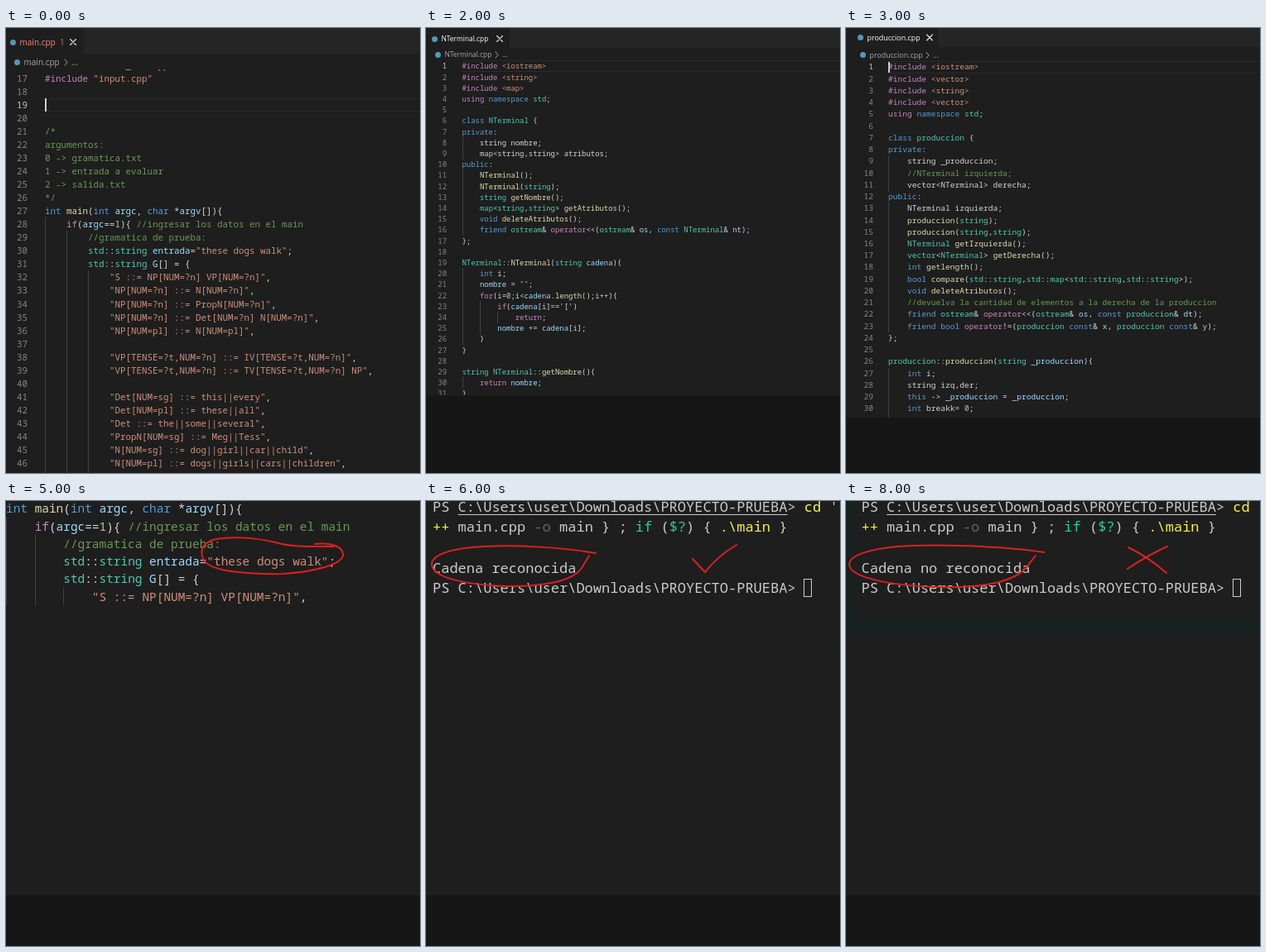
Recreate the animation shown at these times as an HTML page. Size 500 px wide and 538 px high, loop 9000 ms.

```html
<!DOCTYPE html>
<html lang="es">
<head>
<meta charset="utf-8">
<title>Code walkthrough</title>
<style>
html, body { margin: 0; width: 100%; height: 100%; overflow: hidden; background: #161616; }
#stage { position: relative; width: 500px; height: 538px; overflow: hidden; background: #161616; }
.slide { position: absolute; inset: 0; background: #161616; visibility: hidden; animation: show 9s step-end infinite; }
@keyframes show {
  0% { visibility: visible; }
  11.1112%, 100% { visibility: hidden; }
}
.slide div { position: absolute; }
.paper { left: 0; top: 0; width: 500px; background: #1e1e1e; }
.code { left: 0; top: 0; width: 500px; overflow: hidden; }
.line { white-space: pre; font-family: "Noto Sans Mono", "DejaVu Sans Mono", monospace; font-variant-ligatures: none; color: #d4d4d4; }
.guide { width: 1px; background: #404040; }
.current { right: 0; box-sizing: border-box; border: solid #2b2b2b; border-width: 1px 0; }
.ui { white-space: pre; font-family: "Open Sans", "Noto Sans", sans-serif; line-height: 16px; color: #a9a9a9; }
.dot { width: 7px; height: 7px; border-radius: 50%; background: #519aba; }
.bar { background: #252526; right: 0; top: 0; }
svg { position: absolute; left: 0; top: 0; fill: none; stroke-linecap: round; stroke-linejoin: round; }
.key { color: #569cd6; } .ctl { color: #c586c0; } .str { color: #ce9178; }
.com { color: #6a9955; } .type { color: #4ec9b0; } .fn { color: #dcdcaa; }
.var { color: #9cdcfe; } .num { color: #b5cea8; }
.term { color: #cccccc; }
.yel { color: #f5f543; } .grn { color: #23d18b; } .dim { color: #666; }
.under { text-decoration: underline; text-underline-offset: 3px; text-decoration-thickness: 1px; }
</style>
</head>
<body>
<div id="stage"></div>
<script>
const stage = document.getElementById('stage');
const set = words => new Set(words.split(' '));
const KEY = set('int char class private public bool void friend const this namespace true false');
const CTL = set('if else for while return using operator');
const TYPE = set('std string vector map ostream ifstream produccion NTerminal');
const TOKEN = /\/\/.*|"[^"]*"|#include|[A-Za-z_]\w*|\d+|\s+|./g;

function add(parent, cls, style = {}, text = '') {
  const node = document.createElement('div');
  node.className = cls;
  for (const k in style) node.style[k] = typeof style[k] === 'number' ? style[k] + 'px' : style[k];
  node.textContent = text;
  parent.append(node);
  return node;
}

function span(parent, text, cls) {
  const node = document.createElement('span');
  node.textContent = text;
  node.className = cls;
  parent.append(node);
}

function draw(slide, d, color, width) {
  slide.insertAdjacentHTML('beforeend',
    `<svg width="500" height="538" stroke="${color}" stroke-width="${width}"><path d="${d}"/></svg>`);
}

const mark = (slide, d) => draw(slide, d, '#d9201f', 2);

function kind(word, rest, plain) {
  if (/^\/\//.test(word)) return 'com';
  if (word[0] === '"') return 'str';
  if (word === '#include' || CTL.has(word)) return 'ctl';
  if (KEY.has(word)) return 'key';
  if (/^\d/.test(word)) return 'num';
  if (!/^\w/.test(word) || plain) return '';
  if (rest[0] === '(') return 'fn';
  return TYPE.has(word) ? 'type' : 'var';
}

// Line prefixes: % is a whole-line comment, ~ leaves plain names uncoloured.
function paint(node, src) {
  if (src[0] === '%') return span(node, src.slice(1), 'com');
  const plain = src[0] === '~';
  if (plain) src = src.slice(1);
  const inc = src.match(/^(#include )(.*)/);
  if (inc) { span(node, inc[1], 'ctl'); return span(node, inc[2], 'str'); }
  for (const m of src.matchAll(TOKEN))
    span(node, m[0], kind(m[0], src.slice(m.index + m[0].length), plain));
}

let count = 0;
function newSlide(paper) {
  const slide = add(stage, 'slide', { animationDelay: count++ + 's' });
  add(slide, 'paper', { height: paper });
  return slide;
}

// x: first column, y: middle of first line, adv: character width, gap: line pitch
function code(slide, o) {
  const box = add(slide, 'code', { top: o.top || 0, height: o.bottom - (o.top || 0) });
  const size = o.adv / 0.6;
  let indent = 0;
  o.text.split('\n').forEach((src, i) => {
    const top = o.y + i * o.gap - o.gap / 2 - (o.top || 0);
    const pos = { top, height: o.gap, lineHeight: o.gap + 'px', fontSize: size };
    const n = (o.first || 0) + i;
    if (n === o.active) add(box, 'current', { left: o.x, top, height: o.gap });
    const body = src.replace(/^[~%]/, '');
    if (body.trim()) indent = body.search(/\S/);
    for (let c = 0; c < indent; c += 4)
      add(box, 'guide', { left: o.x + c * o.adv, top, height: o.gap + 0.5 });
    if (o.first) add(box, 'line', { ...pos, right: 500 - o.numRight, color: n === o.active ? '#c6c6c6' : '#858585' }, n);
    paint(add(box, 'line', { ...pos, left: o.x }), src);
  });
}

function header(slide, o) {
  add(slide, 'bar', { left: o.tabEnd, height: o.barH });
  const label = (x, y, text, color, italic) =>
    add(slide, 'ui', { left: x, top: y - 8, fontSize: o.size, color, fontStyle: italic ? 'italic' : 'normal' }, text);
  const [ix, iy, jx, jy] = o.icons;
  add(slide, 'dot', { left: ix - 3.5, top: iy - 3.5 });
  add(slide, 'dot', { left: jx - 3.5, top: jy - 3.5 });
  label(ix + 8.5, iy, o.name, o.color || '#ffffff', o.italic);
  if (o.badge) label(o.badge, iy, '1', '#c5705d');
  label(jx + 8.5, jy, o.name, '#a9a9a9');
  label(o.chev + 6, jy, '...', '#a9a9a9');
  draw(slide, `M${o.close - 3.5},${iy - 3.5}l7,7m0,-7l-7,7`, '#e0e0e0', 1.1);
  draw(slide, `M${o.chev - 2},${jy - 3}l3,3.5l-3,3.5`, '#a0a0a0', 1);
}

function terminal(slide, o) {
  const box = add(slide, 'code', { height: o.bottom });
  o.rows.forEach(([row, ...parts]) => {
    const line = add(box, 'line term', {
      left: o.x, top: o.y + (row - 0.5) * o.gap, lineHeight: o.gap + 'px', fontSize: o.adv / 0.6
    });
    parts.forEach(([text, cls = '']) => span(line, text, cls));
  });
}

const caret = (slide, left, top, height) => add(slide, '', { left, top, height, width: 1.5, background: '#d0d0d0' });

let s = newSlide(538);
header(s, { name: 'main.cpp', icons: [8, 17, 13, 41], size: 10, color: '#f48771', badge: 65, close: 81, chev: 73, tabEnd: 94, barH: 31 });
code(s, {
  x: 47, y: 45, adv: 6.5, gap: 16.03, top: 50, bottom: 538, first: 16, numRight: 26, active: 19,
  text: `#include "arbol_sin.cpp"
#include "input.cpp"



%/*
%argumentos:
%0 -> gramatica.txt
%1 -> entrada a evaluar
%2 -> salida.txt
%*/
int main(int argc, char *argv[]){
    if(argc==1){ //ingresar los datos en el main
        //gramatica de prueba:
        std::string entrada="these dogs walk";
        std::string G[] = {
            "S ::= NP[NUM=?n] VP[NUM=?n]",
            "NP[NUM=?n] ::= N[NUM=?n]",
            "NP[NUM=?n] ::= PropN[NUM=?n]",
            "NP[NUM=?n] ::= Det[NUM=?n] N[NUM=?n]",
            "NP[NUM=pl] ::= N[NUM=pl]",

            "VP[TENSE=?t,NUM=?n] ::= IV[TENSE=?t,NUM=?n]",
            "VP[TENSE=?t,NUM=?n] ::= TV[TENSE=?t,NUM=?n] NP",

            "Det[NUM=sg] ::= this||every",
            "Det[NUM=pl] ::= these||all",
            "Det ::= the||some||several",
            "PropN[NUM=sg] ::= Meg||Tess",
            "N[NUM=sg] ::= dog||girl||car||child",
            "N[NUM=pl] ::= dogs||girls||cars||children",
            "IV[TENSE=pres,NUM=sg] ::= disappears||walks",`
});
caret(s, 47, 85, 16);

s = newSlide(444);
header(s, { name: 'input.cpp', icons: [10, 13, 14, 32], size: 8.4, italic: true, close: 68.5, chev: 65, tabEnd: 80, barH: 24 });
const small = { x: 43.5, y: 46, adv: 5.36, gap: 13.2, top: 39, bottom: 444, first: 1, numRight: 25, active: 1 };
code(s, {
  ...small,
  text: `#include <iostream>
#include <fstream>
#include <string>

int getNumeroProducciones(std::string grammartxt){
    std::ifstream myfile(grammartxt);
    if (myfile.is_open())
    {
        int n;
        myfile>>n;
        return n;
    }
    else std::cout << "Unable to open file";
    return 0;
}

int getGrammar(std::string grammartxt,int n,std::string G[]){
    std::ifstream myfile(grammartxt);
    if (myfile.is_open())
    {

        std::string temp;
        getline(myfile, temp); //salto de la primera linea
        for(int i=0;i<n;i++){
            getline(myfile, temp);
            G[i]=temp;
        }
    }
    else std::cout << "Unable to open file";
    return 0;
}`
});

s = newSlide(444);
header(s, { name: 'NTerminal.cpp', icons: [10, 13, 14, 32], size: 8.4, close: 89, chev: 86, tabEnd: 101, barH: 24 });
code(s, {
  ...small,
  text: `#include <iostream>
#include <string>
#include <map>
using namespace std;

class NTerminal {
private:
~    string nombre;
~    map<string,string> atributos;
public:
    NTerminal();
    NTerminal(string);
    string getNombre();
    map<string,string> getAtributos();
    void deleteAtributos();
    friend ostream& operator<<(ostream& os, const NTerminal& nt);
};

NTerminal::NTerminal(string cadena){
~    int i;
    nombre = "";
    for(i=0;i<cadena.length();i++){
        if(cadena[i]=='[')
            return;
        nombre += cadena[i];
    }
}

string NTerminal::getNombre(){
    return nombre;
}`
});

s = newSlide(471);
header(s, { name: 'produccion.cpp', icons: [17, 11.5, 20, 32.5], size: 8.9, close: 101, chev: 99, tabEnd: 111, barH: 23 });
code(s, {
  x: 51, y: 47.5, adv: 5.75, gap: 14.24, top: 40, bottom: 471, first: 1, numRight: 33, active: 1,
  text: `#include <iostream>
#include <vector>
#include <string>
#include <vector>
using namespace std;

class produccion {
private:
~    string _produccion;
    //NTerminal izquierda;
~    vector<NTerminal> derecha;
public:
~    NTerminal izquierda;
    produccion(string);
    produccion(string,string);
    NTerminal getIzquierda();
    vector<NTerminal> getDerecha();
    int getlength();
    bool compare(std::string,std::map<std::string,std::string>);
    void deleteAtributos();
    //devuelva la cantidad de elementos a la derecha de la produccion
    friend ostream& operator<<(ostream& os, const produccion& dt);
    friend bool operator!=(produccion const& x, produccion const& y);
};

produccion::produccion(string _produccion){
~    int i;
~    string izq,der;
    this -> _produccion = _produccion;
~    int breakk= 0;
    //divide la cadena en izquierda y der`
});
caret(s, 51, 41, 13);

s = newSlide(477);
code(s, {
  x: 47, y: 9, adv: 6.5, gap: 16.03, bottom: 405, first: 48, numRight: 26,
  text: `            "TV[TENSE=pres,NUM=sg] ::= sees||likes",
            "IV[TENSE=pres,NUM=pl] ::= disappear||walk",
            "TV[TENSE=pres,NUM=pl] ::= see||like",
        };

        int n = sizeof(G)/sizeof(G[0]);
        parser p(G, n);
        if(p.evaluar(entrada)){
            std::cout << "Cadena reconocida";
        }
        else{
            std::cout << "Cadena no reconocida";
        }
    }
    else{
        //leer los datos desde los archivos
        int n = getNumeroProducciones(argv[1]);
        std::string G[n];
        getGrammar(argv[1], n, G);
        parser p(G, n);
        p.evaluar(argv[2]);
    }
    return 0;
}`
});

s = newSlide(477);
code(s, {
  x: 0, y: 9, adv: 8.66, gap: 21.25, bottom: 126,
  text: `int main(int argc, char *argv[]){
    if(argc==1){ //ingresar los datos en el main
        //gramatica de prueba:
        std::string entrada="these dogs walk";
        std::string G[] = {
            "S ::= NP[NUM=?n] VP[NUM=?n]",`
});
mark(s, 'M396,55C370,55 345,56 325,50C300,44 270,42 250,47C236,52 233,62 240,73C250,86 300,89 335,88C380,85 405,75 407,66C408,56 395,50 373,52');

const prompt = ['C:\\Users\\user\\Downloads\\PROYECTO-PRUEBA'];
const build = [['++ ', 'yel'], ['main.cpp '], ['-o', 'dim'], [' main } ; '], ['if', 'grn'], [' ('], ['$?', 'grn'], [') { '], ['.\\main', 'yel'], [' }']];
const session = result => [
  [0, ['PS '], [prompt[0], 'under'], ['> '], ['cd', 'yel'], [" '"]],
  [1, ...build],
  [3, [result]],
  [4, ['PS ' + prompt[0] + '> ']]
];
const box = (slide, left, top) =>
  add(slide, '', { left, top, width: 8, height: 20, border: '1px solid #cccccc' });

s = newSlide(477);
terminal(s, { x: 8, y: 7, adv: 10.2, gap: 24.6, bottom: 127, rows: session('Cadena reconocida') });
box(s, 456, 94);
mark(s, 'M205,63C165,56 110,53 70,55C28,57 6,66 7,77C8,92 45,101 95,103C145,104 178,96 188,81L197,66M322,70L337,86C348,72 360,62 375,53');

s = newSlide(477);
code(s, {
  x: 16, y: -5.7, adv: 8.75, gap: 21.75, bottom: 163, active: 2,
  text: `%*/
int main(int argc, char *argv[]){
    if(argc==1){ //ingresar los datos en el main
        //gramatica de prueba:
        std::string entrada="these dog walk";
        std::string G[] = {
            "S ::= NP[NUM=?n] VP[NUM=?n]",
            "NP[NUM=?n] ::= N[NUM=?n]",
            "NP[NUM=?n] ::= PropN[NUM=?n]",`
});
add(s, '', { left: 147, top: 29, width: 8, height: 17, border: '1px solid #888' });
caret(s, 462.5, 27, 21);
mark(s, 'M290,93C275,95 263,93 261,86C258,76 262,69 275,68C310,66 350,68 390,66C412,66 418,72 416,79C413,89 395,89 360,91C325,92 300,92 282,94');

s = newSlide(477);
add(s, '', { left: 0, top: 0, width: 500, height: 163, background: '#192020' });
add(s, '', { left: 12, top: 0, width: 488, height: 142, background: '#1e1e1e' });
terminal(s, { x: 18.5, y: 7, adv: 10.2, gap: 24.6, bottom: 142, rows: session('Cadena no reconocida') });
box(s, 467, 94);
mark(s, 'M239,62C200,56 130,52 80,54C30,56 3,66 4,77C5,92 50,102 110,104C170,106 205,96 218,80L229,66M341,56C355,63 370,72 387,87M388,55C372,62 355,72 340,82');
</script>
</body>
</html>
```
